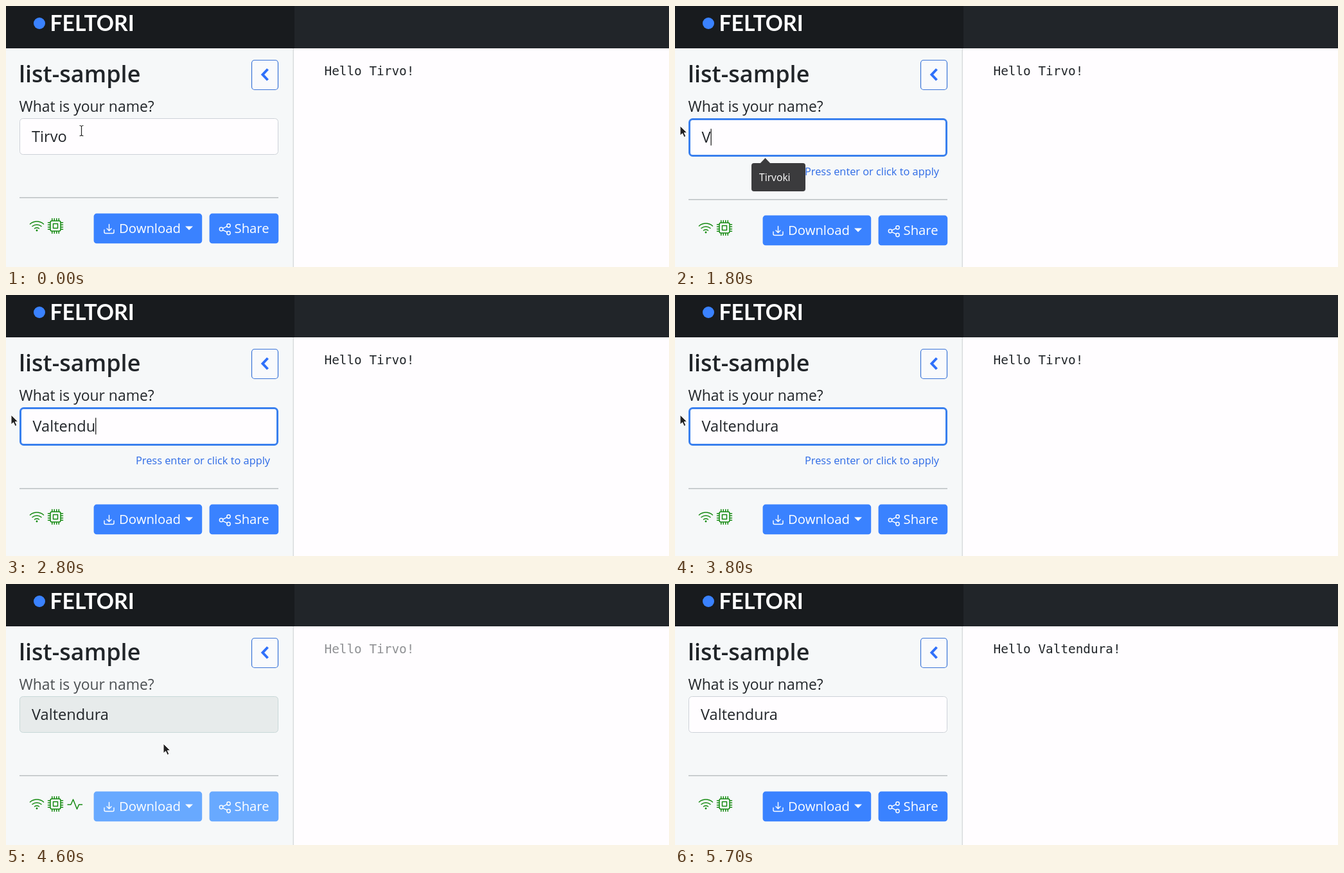
Recreate the animation shown at these times as an HTML page. Size 1032 by 407 pixels, loop 6.1 s.

```html
<!DOCTYPE html>
<html lang="en">
<head>
<meta charset="utf-8">
<title>Name form</title>
<style>
  html, body { margin: 0; width: 100%; height: 100%; overflow: hidden; background: #fffdff; }
  svg { display: block; width: 1032px; height: 407px; }
  text { font-family: "Open Sans", "Noto Sans", sans-serif; fill: #212529; white-space: pre; }
  .line { fill: none; stroke-linecap: round; stroke-linejoin: round; }
  .green { stroke: #168a12; stroke-width: 1.5; }
  .white { stroke: #fff; stroke-width: 1.4; }
  .button { fill: #3a82ff; }
  .button-label { font-size: 20.3px; fill: #fff; }
  .cursor { stroke-linejoin: round; }
</style>
</head>
<body>
<svg viewBox="0 0 1032 407">
  <rect width="1032" height="407" fill="#fffdff"/>
  <rect y="66" width="447" height="341" fill="#f6f8f9"/>
  <rect x="446.5" y="66" width="1.5" height="341" fill="#d9dcde"/>
  <rect width="1032" height="66" fill="#212529"/>
  <rect width="449" height="66" fill="#181b1e"/>
  <circle cx="52" cy="27" r="9" fill="#3a82ff"/>
  <text x="68.5" y="39" style="font: 700 33.7px Lato, sans-serif; fill: #fff">FELTORI</text>

  <text x="20" y="119" font-size="36" font-weight="600">list-sample</text>
  <rect x="382.5" y="84.5" width="41" height="46" rx="4.5" fill="#f9fafc" stroke="#3a74d8" stroke-width="1.2"/>
  <path d="M407.5 98.5l-8 8.5 8 8.5" fill="none" stroke="#2f70fa" stroke-width="4"/>
  <text id="label" x="20.5" y="164.5" font-size="22.9">What is your name?</text>

  <rect id="field" rx="5"/>
  <rect id="selection" y="190" height="29" fill="#1e6fd9"/>
  <text id="value" font-size="23.6"></text>
  <rect id="caret" y="191.5" width="1.2" height="26" fill="#111"/>
  <path id="squiggle" class="line" stroke="#e0202a" stroke-width="1.2"/>

  <g id="tooltip">
    <path d="M132 246l8.5-9 8.5 9z" fill="#3b3b3d"/>
    <rect id="tipBox" x="119" y="245" height="44" rx="4" fill="#3b3b3d"/>
    <text id="tipText" x="131" y="273" font-size="15.7" style="fill: #fff"></text>
  </g>

  <g id="apply">
    <rect id="applyBox" x="190" y="239" width="234" height="38" rx="4" fill="#3070ff"/>
    <text id="applyText" x="202" y="264" font-size="16.35">Press enter or click to apply</text>
  </g>

  <g id="footer">
    <rect x="21" y="298" width="403" height="1.6" fill="#bfc3c6"/>
    <g class="line green">
      <path d="M37.5 340a16 16 0 0 1 21 0M41 343.5a11 11 0 0 1 14 0M44.5 347a6 6 0 0 1 7 0"/>
      <circle cx="48" cy="350" r=".7"/>
      <rect x="69" y="335" width="16" height="16" rx="2.5"/>
      <rect x="73.5" y="339.5" width="7" height="7"/>
      <path id="pins" d="M71.75 331.5v3m3.5-3v3m3.5-3v3m3.5-3v3"/>
      <use href="#pins" transform="rotate(90 77 343)"/>
      <use href="#pins" transform="rotate(180 77 343)"/>
      <use href="#pins" transform="rotate(270 77 343)"/>
      <path id="pulse" d="M96 344h5l3.5-8 6 15 3-7h5"/>
    </g>
    <rect class="button" x="136.6" y="323.6" width="168.6" height="46.6" rx="4.5"/>
    <path class="line white" d="M153 349v3.5a2 2 0 0 0 2 2h11a2 2 0 0 0 2-2v-3.500M160.5 340.5v10m-3.500-3.500l3.5 3.5 3.5-3.500"/>
    <text class="button-label" x="176" y="354">Download</text>
    <path d="M279 343.5h12l-6 6z" fill="#fff"/>
    <rect class="button" x="316.6" y="323.6" width="107.6" height="46.6" rx="4.5"/>
    <g class="line white">
      <circle cx="346.5" cy="342.5" r="2.7"/>
      <circle cx="335" cy="348" r="2.7"/>
      <circle cx="346.5" cy="354" r="2.7"/>
      <path d="M337.5 346.8l6.5-3.1M337.5 349.3l6.5 3.3"/>
    </g>
    <text class="button-label" x="355.5" y="354">Share</text>
  </g>

  <text id="greeting" x="495.5" y="108" style="font: 19.36px 'DejaVu Sans Mono', monospace"></text>

  <defs>
    <path id="beamLine" d="M-2.5-8q2 0 2.5 1.2q.5-1.2 2.5-1.2M0-7v14M-2.5 8q2 0 2.5-1.2q.5 1.2 2.5 1.2"/>
  </defs>
  <g id="pointer">
    <path id="arrow" class="cursor" d="M0 0v15l3.6-3.2 2.6 5.7 2.7-1.2-2.6-5.500h4.6z" fill="#222" stroke="#fff"/>
    <g id="beam" class="line">
      <use href="#beamLine" stroke="#fff" stroke-width="2.6"/>
      <use href="#beamLine" stroke="#222" stroke-width="1.2"/>
    </g>
    <path id="hand" class="cursor" d="M-1.5 9.5V1.5q0-1.5 1.5-1.5t1.5 1.5V6q3-.6 3.5 1 3-.3 3 1.2V12q0 3-2 5H-.5L-4.5 11q-.7-2 1-2z" fill="#fff" stroke="#222" stroke-width="1.1"/>
  </g>
</svg>
<script>
const LOOP = 6100, STEP = 100;
const OLD_NAME = "Tirvo", NEW_NAME = "Valtendura";
const KEY_TIMES = [1800, 2000, 2200, 2300, 2400, 2500, 2700, 2800, 3100, 3200];

// time, x, y, shape; the position is interpolated, the shape holds
const POINTER = [
  [0, 117.5, 194.5, "beam"], [600, 117.5, 194.5, "beam"], [700, 62, 192, "beam"],
  [800, 18, 187, "arrow"], [900, 18, 187, "arrow"], [1000, 8, 187, "arrow"],
  [3800, 8, 187, "arrow"], [3900, 4, 188, "arrow"], [4000, 34, 200, "beam"],
  [4100, 92, 211, "beam"], [4200, 160, 224, "beam"], [4300, 222, 243, "hand"],
  [4400, 248, 247, "hand"], [4500, 245, 249, "arrow"], [5300, 245, 249, "arrow"],
  [5400, 236, 236, "arrow"], [5500, 184, 136, "arrow"], [5600, 99, 21, "arrow"],
  [5700, 99, 21, "none"]
];

const $ = id => document.getElementById(id);
const show = (id, on) => $(id).style.display = on ? "" : "none";
const set = (id, attrs) => {
  for (const key in attrs) $(id).setAttribute(key, attrs[key]);
};
const between = (t, from, to) => t >= from && t < to;

function drawField(t, focused, busy) {
  const typed = KEY_TIMES.filter(time => t >= time).length;
  const x = focused ? 41.5 : 40, y = focused ? 213 : 212;
  const value = $("value");
  value.textContent = typed ? NEW_NAME.slice(0, typed) : OLD_NAME;
  set("value", { x, y });

  set("field", focused
    ? { x: 22.5, y: 176.5, width: 400, height: 57, fill: "#fffdff", stroke: "#3a80ee", "stroke-width": 3 }
    : { x: 21.5, y: 175.5, width: 402, height: 56, fill: busy ? "#e7ebeb" : "#fffdff",
        stroke: busy ? "#c8d8d8" : "#cdd2d8", "stroke-width": 1 });

  const width = value.getComputedTextLength();
  const selectedFrom = t < 800 ? 62 : x;
  show("selection", between(t, 700, 1800));
  set("selection", { x: selectedFrom, width: Math.max(0, x + width - selectedFrom) });
  value.style.fill = between(t, 800, 1800) ? "#fff" : "";

  show("caret", between(t, 1800, 3800));
  set("caret", { x: x + width });

  show("squiggle", t === 4400);
  let wave = `M${x} 217`;
  for (let dx = 2; dx <= width; dx += 2) wave += `L${x + dx} ${dx % 4 ? 215 : 217}`;
  set("squiggle", { d: wave });
}

function drawTooltip(t) {
  const wide = t >= 2000;
  const fade = Math.max(0, (t - 2000) / 200);
  const width = wide ? 132 : 84;
  show("tooltip", between(t, 700, 2300));
  $("tipText").textContent = wide ? "asdfasdfasdra" : "Tirvoki";
  set("tipBox", { width });
  const cx = 119 + width / 2, cy = 267, scale = 1 - 0.045 * fade;
  set("tooltip", {
    opacity: 1 - 0.92 * fade,
    transform: `translate(${cx} ${cy}) scale(${scale}) translate(${-cx} ${-cy})`
  });
}

function drawPointer(t) {
  const last = POINTER.findLastIndex(key => t >= key[0]);
  const [t0, x0, y0, shape] = POINTER[last];
  const [t1, x1, y1] = POINTER[last + 1] || [LOOP, x0, y0];
  const k = (t - t0) / (t1 - t0);
  set("pointer", { transform: `translate(${x0 + (x1 - x0) * k} ${y0 + (y1 - y0) * k})` });
  for (const id of ["arrow", "beam", "hand"]) show(id, id === shape);
}

function draw(t) {
  const focused = between(t, 600, 4500);
  const busy = between(t, 4500, 4800);
  const dim = busy ? (t < 4600 ? 0.5 : 1) : 0;
  drawField(t, focused, busy);
  drawTooltip(t);
  drawPointer(t);

  const hover = t >= 4300;
  show("apply", between(t, 1800, 4500));
  set("applyBox", { opacity: hover ? (t < 4400 ? 0.6 : 1) : 0 });
  $("applyText").style.fill = hover ? "#fff" : "#2e6be6";

  set("footer", { transform: `translate(0 ${focused ? 3 : 0})` });
  for (const button of document.querySelectorAll(".button")) {
    button.style.fill = `color-mix(in srgb, #68a9ff ${dim * 100}%, #3a82ff)`;
  }
  show("pulse", between(t, 4600, 4800));
  set("label", { opacity: 1 - 0.2 * dim });
  set("greeting", { opacity: 1 - 0.5 * dim });
  $("greeting").textContent = `Hello ${t < 4800 ? OLD_NAME : NEW_NAME}!`;
}

function tick() {
  const t = performance.now() % LOOP;
  draw(Math.floor(t / STEP) * STEP);
  requestAnimationFrame(tick);
}
tick();
</script>
</body>
</html>
```
